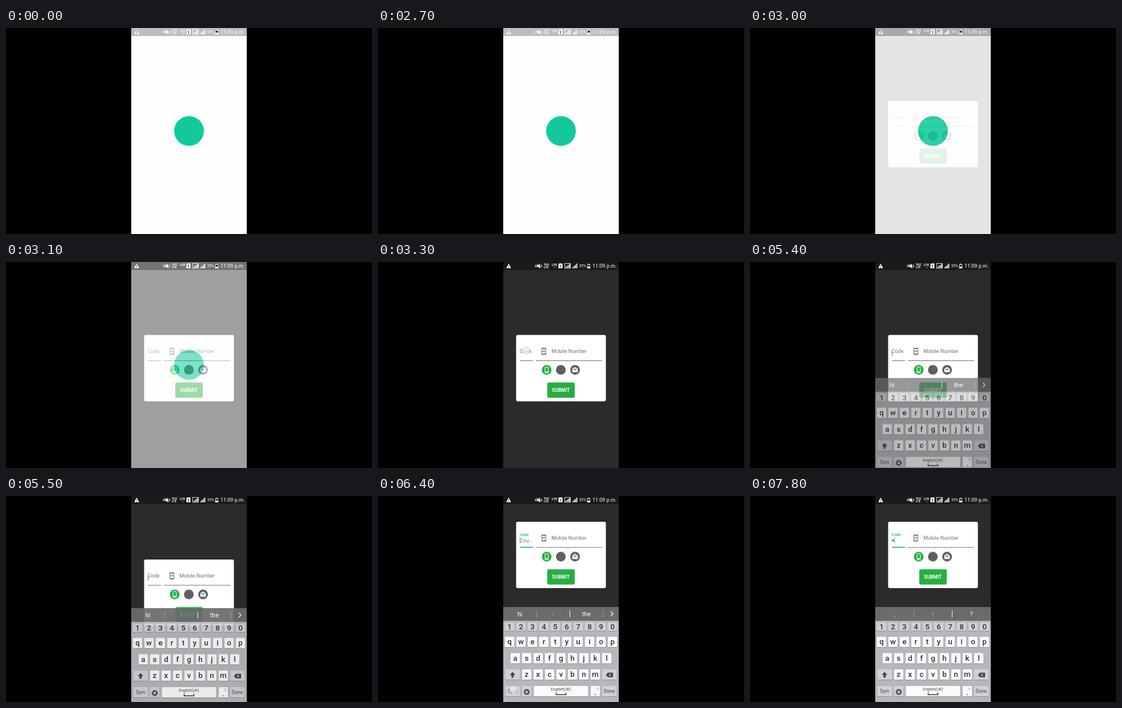
Write an HTML page that moves like this. It is 640x360 px and loops after 8000 ms.

```html
<!DOCTYPE html>
<html lang="en">
<head>
<meta charset="utf-8">
<title>Phone sign-in</title>
<style>
html, body { margin: 0; width: 100%; height: 100%; overflow: hidden; background: #000; }
svg { display: block; width: 100%; height: 100%; font-family: Roboto, "Noto Sans", sans-serif; }
.mid { text-anchor: middle; }
.key { font-size: 13.5px; font-weight: 500; fill: #333; text-anchor: middle; }
.word { font-size: 11px; fill: #fff; text-anchor: middle; }
.pick { fill: #2cc5d8; }
.hint { font-size: 9px; fill: #737373; }
</style>
</head>
<body>
<svg viewBox="0 0 640 360" xmlns="http://www.w3.org/2000/svg">
  <defs>
    <clipPath id="screen"><rect x="219" width="202" height="360"/></clipPath>
    <g id="status" fill="#fff">
      <path d="M228.5 2.8 232.7 10.8H224.3Z"/>
      <path d="M228.5 5.6V8M228.5 8.8V9.8" stroke="#333" stroke-width="1"/>
      <path d="M278 5.5H280L283 3V11L280 8.5H278Z"/>
      <path d="M276.6 4.5V9.5M275 5.2V8.8M284.8 4.5V9.5M286.5 5.2V8.8M277.5 3.2 285 10.8" fill="none" stroke="#fff" stroke-width=".8"/>
      <g font-size="5" font-weight="700">
        <text x="290" y="6.3">Vo))</text>
        <text x="290" y="11.2">LTE</text>
        <text x="304" y="6.6" font-size="5.6">LTE</text>
      </g>
      <path d="M316.8 2.5H322.5V11H315.5V4Z"/>
      <text x="319" y="9.6" class="mid" font-size="7.5" font-weight="700" fill="#222">1</text>
      <rect x="326.5" y="2.5" width="10" height="8.5" fill="none" stroke="#fff" stroke-width=".8"/>
      <path d="M328 10V8H329.4V10ZM330.2 10V6.5H331.6V10ZM332.3 10V5H333.7V10ZM334.4 10V3.6H335.8V10Z"/>
      <path d="M340 11V9H341.6V11ZM342.2 11V7H343.8V11ZM344.5 11V5H346.1V11ZM346.8 11V2.8H348.4V11Z"/>
      <text x="351.7" y="9.4" font-size="6.5">35%</text>
      <path d="M367.3 3H369.7V4H371.2V11.2H365.8V4H367.3Z"/>
      <rect x="366.6" y="4.7" width="3.8" height="3.3" fill="#111"/>
      <text x="375" y="10.2" font-size="9">11:09 p.m.</text>
    </g>
  </defs>

  <rect width="640" height="360"/>
  <g clip-path="url(#screen)">
    <g id="splash">
      <rect x="219" width="202" height="360" fill="#fefefe"/>
      <rect x="219" width="202" height="14" fill="#bdbdbd"/>
      <use href="#status"/>
      <path id="arrows" d="M307 8.6H309L308 11ZM309.3 10.8H311.3L310.3 8.4Z" fill="#fff"/>
      <circle cx="320" cy="180" r="26" fill="#13c99b"/>
    </g>

    <g id="form">
      <rect x="219" width="202" height="360" fill="#2b2b2b"/>
      <rect x="219" width="202" height="14" fill="#1a1a1a"/>
      <use href="#status"/>
      <path d="M307 8.6H309L308 11ZM309.3 10.8H311.3L310.3 8.4Z" fill="#666"/>

      <g id="card">
        <rect x="241.5" y="45" width="157" height="116" rx="3" fill="#fff"/>
        <g id="idle">
          <text x="247.7" y="76.4" class="hint">Code</text>
          <path d="M248 90H271" stroke="#6d6d6d"/>
        </g>
        <g id="focus">
          <text x="247.8" y="70" font-size="6.8" font-weight="500" fill="#16b59e">Code</text>
          <path d="M248 89.6H271" stroke="#12a594" stroke-width="1.6"/>
          <text id="country" x="247.7" y="81" class="hint">Cou…</text>
          <text id="plus" x="247.6" y="80.6" font-size="9" fill="#222">+</text>
        </g>
        <path id="caret" d="M248.4 73.3V82.3" stroke="#3f7fc0"/>
        <path d="M286 67.5H294V79.5H286Z" fill="#666"/>
        <path d="M287 69.3H293V77.7H287Z" fill="#fff"/>
        <path d="M288.2 75V73H291M290 71.2 292 73 290 74.8" fill="none" stroke="#555" stroke-width=".9"/>
        <text x="303.3" y="76.4" class="hint">Mobile Number</text>
        <path d="M276 90H392" stroke="#6d6d6d"/>
        <circle cx="295" cy="106" r="8.5" fill="#27ae42"/>
        <rect x="292.2" y="101" width="5.6" height="10" rx="1" fill="none" stroke="#fff" stroke-width="1.1"/>
        <path d="M292.2 109.6H297.8" stroke="#fff" stroke-width="1.2"/>
        <circle cx="319.7" cy="106" r="8.5" fill="#5f5f5f"/>
        <circle cx="344.6" cy="106" r="8.5" fill="#5f5f5f"/>
        <path d="M339.8 104 344.6 101 349.4 104V110H339.8Z" fill="#fff"/>
        <path d="M340.8 104.3 344.6 106.8 348.4 104.3Z" fill="#5f5f5f"/>
        <rect x="296" y="128" width="48" height="27" rx="3" fill="#27ae42"/>
        <text x="319.8" y="144.3" class="mid" font-size="8.4" font-weight="700" fill="#fff">SUBMIT</text>
      </g>
    </g>

    <g id="board">
      <rect x="219" y="194" width="202" height="24" fill="#6b6b6b"/>
      <rect x="219" y="218" width="202" height="142" fill="#b5b7bd"/>
      <g id="words">
        <text x="248" y="209.8" class="word">hi</text>
        <text x="306" y="209.8" class="word pick">i</text>
        <text x="364.5" y="209.8" class="word">the</text>
        <path d="M277.5 200V212M393.5 200V212" stroke="#999"/>
        <path d="M335.5 200V212" stroke="#fff"/>
        <path d="M407 202 411 206 407 210" fill="none" stroke="#fff" stroke-width="1.3"/>
      </g>
      <g id="marks">
        <text x="252.5" y="209.8" class="word">,</text>
        <text x="319.5" y="209.8" class="word pick">+</text>
        <text x="387" y="209.8" class="word">?</text>
        <path d="M286.5 200V212" stroke="#999"/>
        <path d="M353.5 200V212" stroke="#fff"/>
      </g>
      <g id="common"></g>
      <g id="letters"></g>
      <g id="symbols"></g>
    </g>
    <g id="touch">
      <circle r="6.6" fill="#eef2fa" fill-opacity=".65" stroke="#b4bfd0" stroke-opacity=".75"/>
    </g>
  </g>
</svg>
<script>
const LOOP = 8000;
const $ = id => document.getElementById(id);

function make(parent, tag, attrs, text) {
  const el = document.createElementNS('http://www.w3.org/2000/svg', tag);
  for (const k in attrs) el.setAttribute(k, attrs[k]);
  if (text) el.textContent = text;
  parent.append(el);
  return el;
}

function cap(parent, x, y, w, h, fill) {
  make(parent, 'rect', { x, y: y + 0.9, width: w, height: h, rx: 1.2, fill: '#8c8e94' });
  make(parent, 'rect', { x, y, width: w, height: h, rx: 1.2, fill });
}

function row(parent, chars, x, y, h = 18, fill = '#fafafa', drop = 13) {
  [...chars].forEach((c, i) => {
    cap(parent, x + i * 20 - 8, y, 16, h, fill);
    make(parent, 'text', { x: x + i * 20, y: y + drop, class: 'key' }, c);
  });
}

function label(parent, x, y, text, size) {
  make(parent, 'text', { x, y, class: 'mid', 'font-size': size, fill: '#444' }, text);
}

const GREY = '#cfd1d6', common = $('common'), letters = $('letters'), symbols = $('symbols');

row(common, '1234567890', 230, 221, 14.5, GREY, 12.2);
for (const [x, y, w] of [[222.5, 303, 25.5], [392, 303, 25.5], [222.5, 332, 25.5], [252, 332, 16], [392, 332, 25.5]])
  cap(common, x, y, w, 18, GREY);
cap(common, 272.5, 332, 95, 18, '#fafafa');
cap(common, 372, 332, 16, 18, '#fafafa');
label(common, 320, 340, 'English(UK)', 6.8);
make(common, 'path', { d: 'M311.5 343.5V347.3H328.5V343.5', fill: 'none', stroke: '#333', 'stroke-width': 1.4 });
make(common, 'text', { x: 380, y: 347.5, class: 'key' }, '.');
label(common, 383, 338.5, "',?", 5.5);
label(common, 264, 338.5, '…', 5.5);
label(common, 404.5, 344.2, 'Done', 8.4);
make(common, 'circle', { cx: 260, cy: 342.5, r: 3.2, fill: 'none', stroke: '#444', 'stroke-width': 2 });
make(common, 'circle', { cx: 260, cy: 342.5, r: 4.8, fill: 'none', stroke: '#444', 'stroke-width': 1.6, 'stroke-dasharray': '1.9 1.87' });
make(common, 'path', { d: 'M398.5 312.8 402 308.8H411V316.8H402Z', fill: '#444' });
make(common, 'path', { d: 'M403.5 310.8 407.8 314.8M407.8 310.8 403.5 314.8', stroke: '#eee' });

row(letters, 'qwertyuiop', 230, 246);
row(letters, 'asdfghjkl', 240, 274.5);
row(letters, 'zxcvbnm', 260, 303);
make(letters, 'path', { d: 'M235.3 307.5 240.3 312.8H237.2V317.5H233.4V312.8H230.3Z', fill: '#444' });
label(letters, 235.2, 344.2, 'Sym', 8.4);

row(symbols, '+×÷=%_€£¥₩', 230, 246);
row(symbols, '!@#$/^&*()', 230, 274.5);
row(symbols, '-\'":;,?', 260, 303);
label(symbols, 235.2, 315.2, '1/2', 8.4);
label(symbols, 235.2, 344.2, 'ABC', 8.4);

// table: [time, value] pairs, each value held until the next one
function play(id, prop, table) {
  const frames = table.map(([t, v]) => ({ offset: t / LOOP, [prop]: v, easing: 'steps(1, end)' }));
  frames.push({ offset: 1, [prop]: table[table.length - 1][1] });
  $(id).animate(frames, { duration: LOOP, iterations: Infinity });
}
const fade = (id, ...table) => play(id, 'opacity', table);
const move = (id, ...table) =>
  play(id, 'transform', table.map(([t, x, y]) => [t, `translate(${x}px, ${y}px)`]));

fade('arrows', [0, 1], [100, 0.6], [2700, 0]);
fade('form', [0, 0], [2900, 0.04], [3000, 0.123], [3100, 0.45], [3200, 0.84], [3300, 1]);
move('card', [0, 0, 82.5], [5500, 0, 66], [5600, 0, 18], [5700, 0, 0]);
fade('idle', [0, 1], [5600, 0]);
fade('focus', [0, 0], [5600, 1]);
fade('country', [0, 1], [7300, 0]);
fade('plus', [0, 0], [7300, 1]);
fade('caret', [0, 0], [5300, 1], [6600, 0], [7300, 1]);
move('caret', [0, 0, 0], [7300, 4.4, 0]);

fade('board', [0, 0], [5300, 0.3], [5400, 0.7], [5500, 0.93], [5600, 1]);
move('board', [0, 0, 20], [5400, 0, 8.7], [5500, 0, 2], [5600, 0, 0]);
fade('letters', [0, 1], [6500, 0], [7800, 1]);
fade('symbols', [0, 0], [6500, 1], [7800, 0]);
fade('words', [0, 1], [7300, 0]);
fade('marks', [0, 0], [7300, 1]);

move('touch', [0, 259, 155], [6400, 236.5, 338.5], [7100, 229, 251.5], [7600, 236, 341.5]);
fade('touch', [0, 0], [3300, 1], [4700, 0.7], [4800, 0.35], [4900, 0], [6400, 1], [6600, 0.5], [6700, 0],
  [7100, 1], [7300, 0.5], [7400, 0], [7600, 1], [7700, 0.5], [7800, 0]);
</script>
</body>
</html>
```
